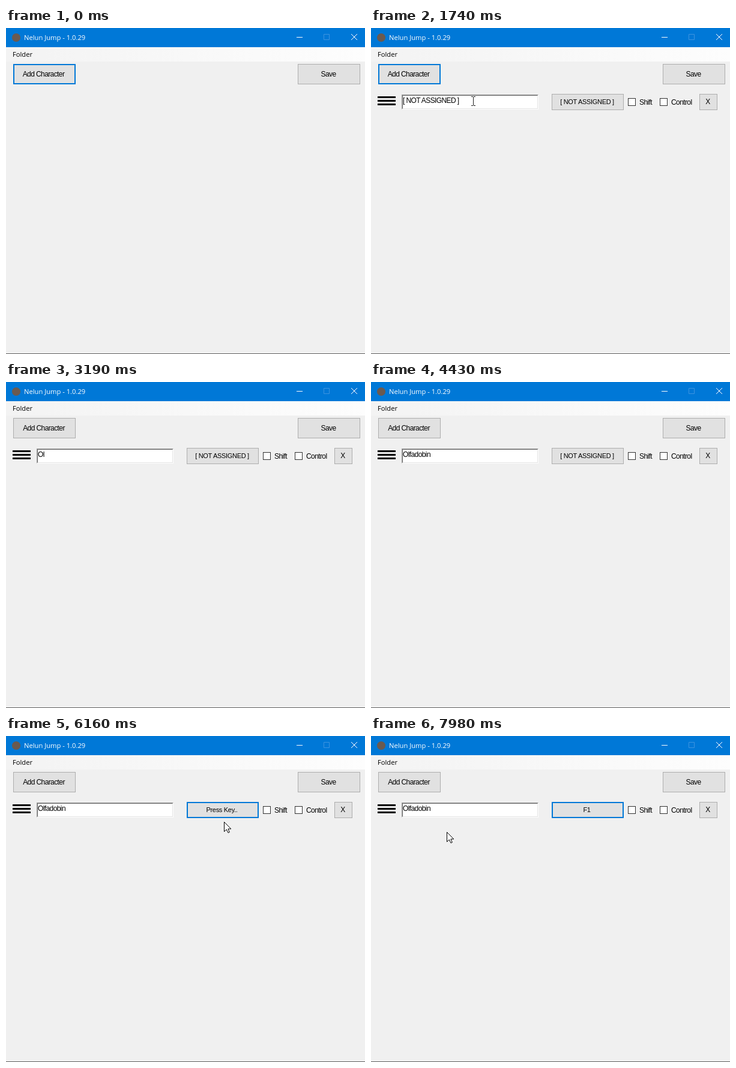
Write an HTML page that moves like this. It is 598 px wide and 544 px high and loops after 8000 ms.

```html
<!DOCTYPE html>
<html lang="en">
<head>
<meta charset="utf-8">
<title>Character hotkeys</title>
<style>
html, body { margin: 0; width: 100%; height: 100%; overflow: hidden; }
body { position: relative; background: #f0f0f0; color: #000; font: 12px "Liberation Sans", Arial, sans-serif; letter-spacing: -.6px; }
body * { position: absolute; box-sizing: border-box; white-space: pre; }
#titlebar, #menu { left: 0; width: 598px; font: 11.2px "Open Sans", "Noto Sans", sans-serif; letter-spacing: 0; }
#titlebar { top: 0; height: 32px; line-height: 32px; background: #0078d7; color: #fff; }
#menu { top: 32px; height: 24px; line-height: 24px; background: linear-gradient(90deg, #f3f3f3, #fdfdfd); }
#titlebar span { left: 30px; top: 0; }
#menu span { left: 11px; top: 0; }
#icon { left: 10px; top: 9px; width: 14px; height: 14px; border-radius: 50%; background: #6b5a50; }
#edge { left: 0; top: 543px; width: 598px; height: 1px; background: #5f5f5f; }
svg { left: 0; top: 0; overflow: visible; }
.button { border: 1px solid #adadad; background: #e1e1e1; }
.button span { left: -2px; right: 0; top: -1px; text-align: center; }
.button.focus { border: 2px solid #0078d7; }
.button.focus span { left: -3px; top: -2px; }
.button.hover { border-color: #0078d7; background: #e5f1fb; }
.button.down { border-color: #005499; background: #cce4f7; }
.small { font-size: 11px; letter-spacing: -.3px; }
#grip { left: 11px; top: 114px; width: 30px; height: 15px; background: repeating-linear-gradient(#000 0 3px, transparent 3px 6px); }
.check { top: 117px; width: 13px; height: 13px; border: 1px solid #333; background: #fff; }
.check span { left: 18px; top: -4px; line-height: 20px; }
#field { left: 51px; top: 111px; width: 228px; height: 25px; background: #fff;
  border: 1px solid; border-color: #a0a0a0 #fff #fff #a0a0a0; }
#field::before { content: ""; position: absolute; inset: 0; border: 1px solid; border-color: #696969 #e3e3e3 #e3e3e3 #696969; }
#selection { top: 114px; height: 13px; background: #99c9ef; }
#name { left: 53px; top: 114px; line-height: 14px; }
#caret { left: 98px; top: 114px; width: 1px; height: 13px; background: #000; }
</style>
</head>
<body>
<div id="titlebar">
  <div id="icon"></div><span>Nelun Jump - 1.0.29</span>
  <svg width="598" height="32" fill="none" stroke="#fff">
    <path d="M484 15.5h10M575 10l10 10M585 10l-10 10"/>
    <path d="M529.5 10.5h9v9h-9z" stroke="#3d94e0"/>
  </svg>
</div>
<div id="menu"><span>Folder</span></div>
<div id="row">
  <div id="grip"></div>
  <div id="field"></div>
  <div id="selection"></div>
  <div id="name"></div>
  <div id="caret"></div>
  <div class="check" style="left:428px"><span>Shift</span></div>
  <div class="check" style="left:481px"><span>Control</span></div>
</div>
<div id="edge"></div>
<svg id="pointer" width="1" height="1">
  <circle id="halo" cx="-.5" r="12" fill="#fafa3c" fill-opacity=".7"/>
  <path id="arrow" d="M.5 .5V16.5L4.3 13 7 18.5 9.3 17.5 6.9 12H11.8z" fill="#fff" stroke="#000"/>
  <path id="beam" d="M-3 -7.5H0M1 -7.5H4M.5 -7V7M-3 7.5H0M1 7.5H4" fill="none" stroke="#222"/>
</svg>
<script>
const LOOP = 8000;
const UNSET = '[ NOT ASSIGNED ]';
const TYPED = 'Olfadobin';
const TYPE_START = 3020, KEY_GAP = 110, CARET_START = 3900, BLINK = 530;
const TEXT_LEFT = 53, TEXT_RIGHT = 146;

const $ = id => document.getElementById(id);
const between = (t, from, to) => t >= from && t < to;
const clamp = (v, low, high) => Math.min(high, Math.max(low, v));
const show = (el, on) => { el.style.visibility = on ? 'visible' : 'hidden'; };
const inside = (p, [x, y, w, h]) => p.x >= x && p.x < x + w && p.y >= y && p.y < y + h;

// Each move starts where the last one ended; bend bows the path sideways.
const move = (start, end, x, y, bend = 0) => ({ start, end, x, y, bend });
const MOVES = [
  move(0, 0, 432, 506),
  move(240, 800, 73, 70),
  move(1270, 1740, 170, 122, .35),
  move(1930, 2280, 14, 90),
  move(2310, 2550, 208, 503),
  move(4830, 4830, 514, 528),
  move(4830, 5420, 363, 132, -.17),
  move(6160, 6160, 363, 142),
  move(6160, 6430, 372, 261),
  move(7740, 7980, 126, 160)
];

function pointerAt(t) {
  let x = 0, y = 0;
  for (const m of MOVES) {
    if (t < m.start) break;
    const k = t < m.end ? Math.sin((t - m.start) / (m.end - m.start) * Math.PI / 2) : 1;
    const bow = m.bend * Math.sin(k * Math.PI);
    const dx = m.x - x, dy = m.y - y;
    x += dx * k - dy * bow;
    y += dy * k + dx * bow;
  }
  return { x: Math.round(x), y: Math.round(y) };
}

function makeButton(parent, rect, text, style = '') {
  const el = document.createElement('div');
  const label = document.createElement('span');
  ['left', 'top', 'width', 'height'].forEach((side, i) => { el.style[side] = rect[i] + 'px'; });
  label.style.lineHeight = rect[3] + 'px';
  label.textContent = text;
  el.append(label);
  parent.append(el);
  const setState = state => { el.className = `button ${style} ${state}`; };
  setState('');
  return { label, rect, setState };
}

const addButton = makeButton(document.body, [12, 60, 104, 34], 'Add Character');
makeButton(document.body, [486, 60, 104, 34], 'Save');
const keyButton = makeButton($('row'), [301, 110, 120, 27], UNSET, 'small');
makeButton($('row'), [547, 110, 30, 27], 'X');
document.body.append($('pointer'));

function paintButton(button, pointer, active, down, focus) {
  const hover = active && inside(pointer, button.rect);
  button.setState(down ? 'down' : hover ? 'hover' : focus ? 'focus' : '');
}

function render(t) {
  const p = pointerAt(t);
  const visible = between(t, 240, 2550) || t >= 4830;
  const dragging = between(t, 1880, 2310);
  const rowShown = t >= 1230;
  const beam = dragging || (rowShown && inside(p, [51, 111, 228, 25]));

  paintButton(addButton, p, visible && t < 1880, between(t, 1170, 1230), t < 1880);
  paintButton(keyButton, p, visible && rowShown, between(t, 5740, 5790), t >= 5740);
  keyButton.label.textContent = t < 5790 ? UNSET : t < 6930 ? 'Press Key..' : 'F1';

  show($('row'), rowShown);
  const typed = Math.floor((t - TYPE_START) / KEY_GAP) + 1;
  $('name').textContent = typed > 0 ? TYPED.slice(0, typed) : UNSET;
  const from = dragging ? clamp(p.x, TEXT_LEFT, TEXT_RIGHT) : TEXT_LEFT;
  $('selection').style.left = from + 'px';
  $('selection').style.width = TEXT_RIGHT - from + 'px';
  show($('selection'), between(t, 1880, TYPE_START));
  show($('caret'), between(t, CARET_START, 5420) && Math.floor((t - CARET_START) / BLINK) % 2 === 0);

  $('pointer').style.transform = `translate(${p.x}px, ${p.y}px)`;
  show($('arrow'), visible && !beam);
  show($('beam'), visible && beam);
  show($('halo'), between(t, 1070, 1230) || dragging || between(t, 5690, 5790));
}

const start = performance.now();
function tick() {
  render((performance.now() - start) % LOOP);
  requestAnimationFrame(tick);
}
tick();
</script>
</body>
</html>
```
